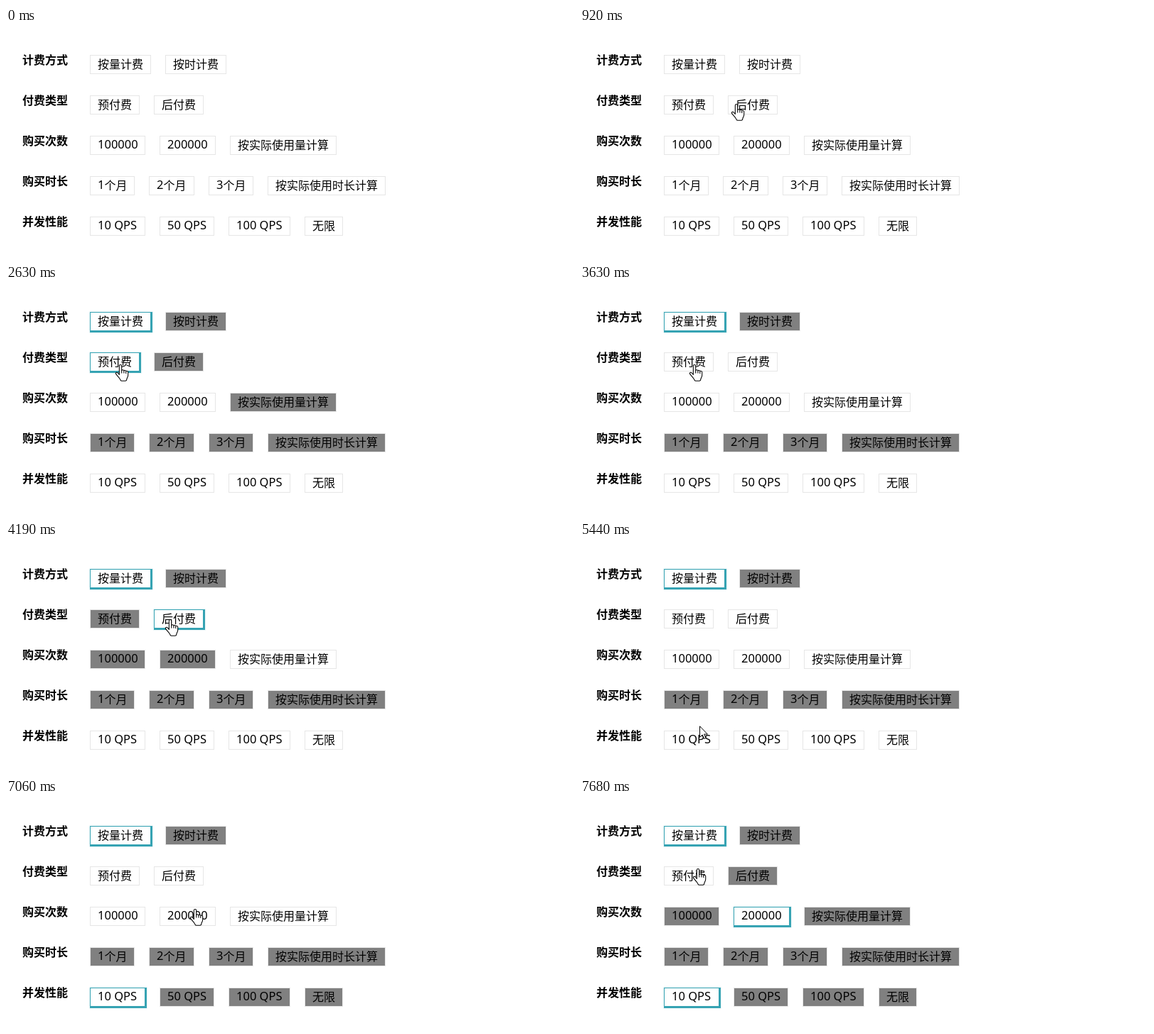
An HTML page that plays this animation: 799 by 323 pixels, repeating every 8 s.

```html
<!DOCTYPE html>
<html lang="zh-CN">
<head>
<meta charset="utf-8">
<title>计费选项</title>
<style>
  html, body { margin: 0; width: 100%; height: 100%; overflow: hidden; background: #fff; }
  svg { display: block; width: 799px; height: 323px; }
  text { font: 16px "Noto Sans CJK SC", "Noto Sans CJK", "Noto Sans CJK JP", sans-serif; white-space: pre; }
  text.label { font-weight: bold; }
  text.latin { font: 16.5px "Noto Sans", "Open Sans", sans-serif; }
</style>
</head>
<body>
<svg id="stage" viewBox="0 0 799 323" xmlns="http://www.w3.org/2000/svg">
  <g id="rows"></g>
  <g id="cursor">
    <path id="arrow" d="M.5 .8V16.4L4.2 13 6.7 18.5 9 17.5 6.6 12.1H11.4Z" fill="#fff" stroke="#000"/>
    <g id="hand" transform="translate(-7.5 -1) scale(1.06 1)" fill="none" stroke="#000" stroke-linejoin="round">
      <path fill="#fff" d="M5.5 14.5V2.2a1.6 1.6 0 0 1 3.2 0V8.5c.4-1 2.6-.9 3 .3 .6-.8 2.4-.5 2.7.7 .8-.6 2.8-.2 2.8 1.6V15c0 3-1.6 4-1.8 6 -.1 1.6-.6 2.3-1.8 2.3H8.6C7.4 23.3 7 22.4 6.8 21.4 6 19 3.2 16.6 1 13.4 .2 11.6 2.2 10.6 3.4 11.8Z"/>
      <path d="M8.7 8.5V12.4M11.7 8.9V12.6M14.4 9.8V13"/>
    </g>
    <g id="stop" fill="none">
      <circle r="8.2" cx=".5" cy=".5" fill="#fff"/>
      <circle r="6.4" cx=".5" cy=".5" stroke="#c4161c" stroke-width="2.4"/>
      <path d="M-4 -4 5 5" stroke="#c4161c" stroke-width="2.4"/>
    </g>
  </g>
</svg>
<script>
const LOOP = 8000, ROW_H = 57, BTN_H = 27;
const TEAL = "#36a3b3", GRAY = "#808080", LINE = "#e6e6e6";
const $ = id => document.getElementById(id);

// Each option: text, left edge, width
const rows = [
  ["计费方式", ["按量计费", 118, 86], ["按时计费", 224, 86]],
  ["付费类型", ["预付费", 118, 70], ["后付费", 208, 70]],
  ["购买次数", ["100000", 118, 78], ["200000", 216, 79], ["按实际使用量计算", 315, 150]],
  ["购买时长", ["1个月", 118, 63], ["2个月", 201, 64], ["3个月", 285, 63], ["按实际使用时长计算", 368, 166]],
  ["并发性能", ["10 QPS", 118, 78], ["50 QPS", 216, 77], ["100 QPS", 313, 87], ["无限", 420, 54]]
];

// Options in other rows ruled out by a choice
const conflicts = {
  "按量计费": ["1个月", "2个月", "3个月", "按实际使用时长计算"],
  "预付费": ["按实际使用量计算"],
  "后付费": ["100000", "200000"],
  "200000": ["后付费"]
};

// Clicks toggle an option
const clicks = [
  [1080, "按量计费"], [2630, "预付费"], [3630, "预付费"], [4110, "后付费"],
  [4970, "后付费"], [5730, "10 QPS"], [7140, "200000"]
];

// Pointer moves: first step, last step, step count, end point
const moves = [
  [220, 220, 1, 454, 296], [300, 300, 1, 451, 292],
  [530, 1000, 7, 167, 65],
  [1690, 1690, 1, 175, 55], [1770, 1840, 2, 178, 51], [1920, 2070, 3, 174, 56],
  [2240, 2630, 6, 161, 113],
  [3800, 3950, 3, 231, 110],
  [5210, 5440, 4, 168, 259], [5520, 5650, 3, 165, 278],
  [6300, 6300, 1, 235, 227], [6380, 6380, 1, 350, 184],
  [6600, 7060, 7, 266, 156],
  [7370, 7610, 4, 168, 96], [7680, 7680, 1, 166, 99]
];

function add(parent, tag, attrs, text) {
  const el = document.createElementNS("http://www.w3.org/2000/svg", tag);
  for (const k in attrs) el.setAttribute(k, attrs[k]);
  if (text) el.textContent = text;
  parent.appendChild(el);
  return el;
}

const box = (g, x, y, w, h, fill) => add(g, "rect", { x, y, width: w, height: h, fill });

// Latin runs use their own face; a leading digit is followed by Chinese text
function addText(g, text, x, y) {
  const latin = text.match(/^[ -~]*/)[0], rest = text.slice(latin.length);
  if (latin) add(g, "text", { x, y: y + 18, class: "latin" }, latin);
  if (rest) add(g, "text", { x: x + latin.length * 9.4, y: y + 19 }, rest);
}

const buttons = [];
rows.forEach(([label, ...options], row) => {
  const y = 38 + row * ROW_H;
  add($("rows"), "text", { x: 23, y: y + 13, class: "label" }, label);
  for (const [name, x, w] of options) {
    const g = add($("rows"), "g", {});
    const glow = add(g, "g", {});
    box(glow, x - 1, y - 1, w + 4, BTN_H + 4, TEAL).setAttribute("opacity", .08);
    box(glow, x, y, w + 2, BTN_H + 2, TEAL);
    const edge = box(g, x, y, w, BTN_H, LINE);
    const face = box(g, x + 1, y + 1, w - 2, BTN_H - 2, "#fff");
    addText(g, name, x + 11, y);
    buttons.push({ name, row, x, y, w, glow, edge, face });
  }
});

// Expand the moves into single pointer positions
const path = [];
let px = 454, py = 323;
for (const [t0, t1, n, x, y] of moves) {
  for (let i = 0; i < n; i++) {
    const t = n > 1 ? t0 + (t1 - t0) * i / (n - 1) : t0;
    const k = (1 - Math.cos(Math.PI * (i + 1) / n)) / 2;
    path.push({ t, x: Math.round(px + (x - px) * k), y: Math.round(py + (y - py) * k) });
  }
  px = x;
  py = y;
}

const show = (el, on) => el.setAttribute("visibility", on ? "visible" : "hidden");

function draw(t) {
  const chosen = new Set();
  for (const [at, name] of clicks) {
    if (t >= at && !chosen.delete(name)) chosen.add(name);
  }
  const picked = buttons.filter(b => chosen.has(b.name));
  for (const b of buttons) {
    const on = chosen.has(b.name);
    b.off = !on && picked.some(p => p.row === b.row || (conflicts[p.name] || []).includes(b.name));
    show(b.glow, on);
    b.edge.setAttribute("fill", on ? TEAL : LINE);
    b.face.setAttribute("fill", b.off ? GRAY : "#fff");
  }

  const p = path.filter(s => s.t <= t).pop();
  let kind = "";
  if (p) {
    const hit = buttons.find(b => p.x >= b.x && p.x <= b.x + b.w && p.y >= b.y && p.y <= b.y + BTN_H);
    kind = !hit ? "arrow" : hit.off ? "stop" : "hand";
    $("cursor").setAttribute("transform", `translate(${p.x} ${p.y})`);
  }
  for (const id of ["arrow", "hand", "stop"]) show($(id), id === kind);
}

const start = performance.now();
function tick() {
  draw((performance.now() - start) % LOOP);
  requestAnimationFrame(tick);
}
tick();
</script>
</body>
</html>
```
